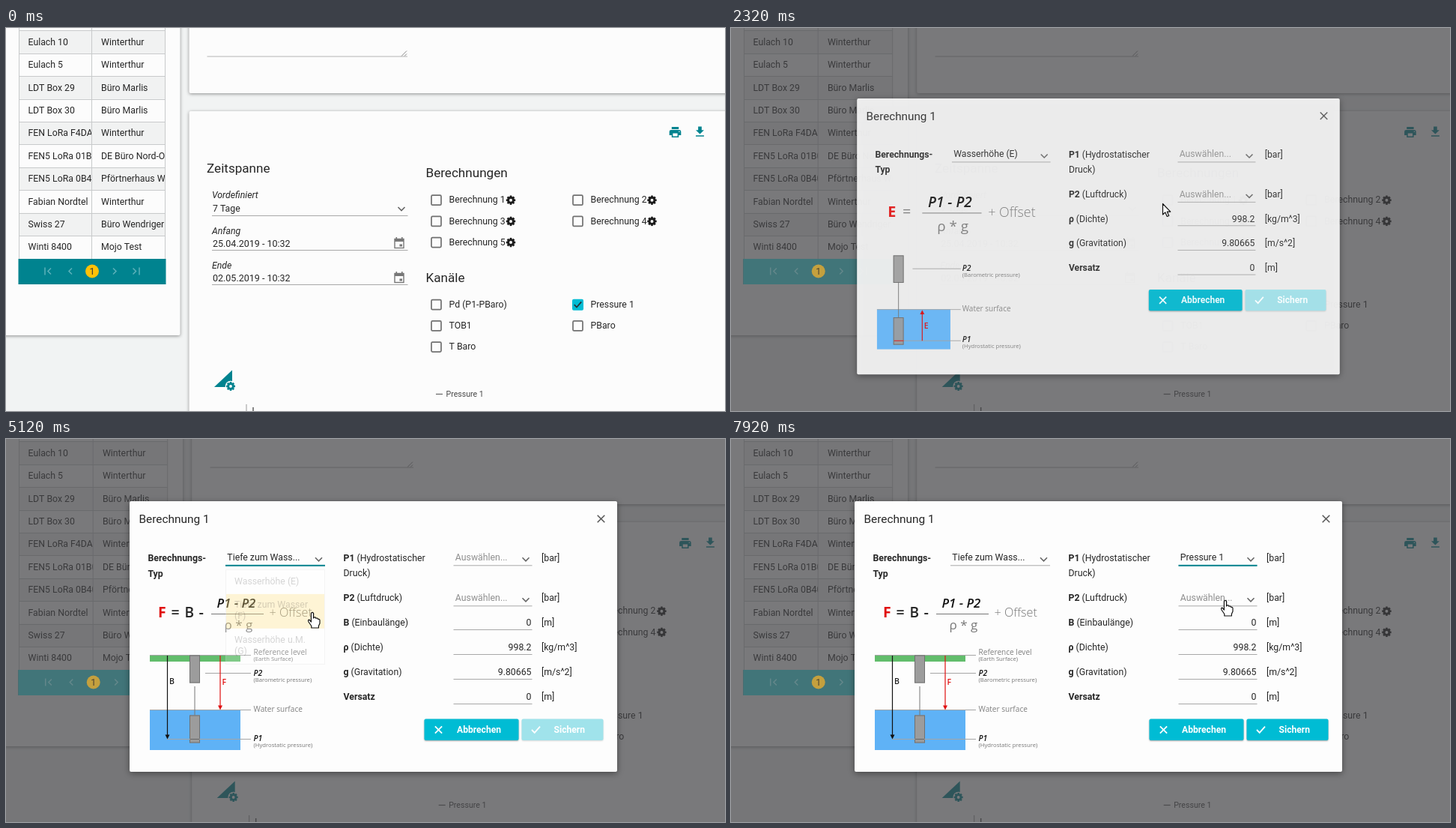
Recreate the animation shown at these times as an HTML page with a canvas. Size 960 px wide and 511 px high, loop 8000 ms.

```html
<!DOCTYPE html>
<html lang="de">
<head>
<meta charset="utf-8">
<title>Berechnung</title>
<style>
html, body { margin: 0; width: 100%; height: 100%; overflow: hidden; background: #f1f3f3; }
canvas { display: block; width: 960px; height: 511px; }
</style>
</head>
<body>
<canvas id="stage" width="960" height="511"></canvas>
<script>
const ctx = document.getElementById('stage').getContext('2d');
const LOOP = 8000;
const ROBOTO = 'Roboto, sans-serif', OPEN = '"Open Sans", sans-serif';
const TEAL = '#00838f', CYAN = '#00bcd4', INK = '#262626', GREY = '#777', RED = '#e01010';

const clamp = v => Math.max(0, Math.min(1, v));
const within = (t, a, b) => t >= a && t < b;

function text(s, x, y, { size = 12.3, color = INK, style = '400', align = 'left', font = ROBOTO } = {}) {
  ctx.font = `${style} ${size}px ${font}`;
  ctx.fillStyle = color;
  ctx.textAlign = align;
  ctx.fillText(s, x, y);
}
function rect(x, y, w, h, color) {
  ctx.fillStyle = color;
  ctx.fillRect(x, y, w, h);
}
function line(points, color, width = 1) {
  ctx.beginPath();
  points.forEach(([x, y], i) => i ? ctx.lineTo(x, y) : ctx.moveTo(x, y));
  ctx.strokeStyle = color;
  ctx.lineWidth = width;
  ctx.stroke();
}
function poly(points, color) {
  ctx.beginPath();
  points.forEach(([x, y]) => ctx.lineTo(x, y));
  ctx.closePath();
  ctx.fillStyle = color;
  ctx.fill();
}
function disc(x, y, r, color) {
  ctx.beginPath();
  ctx.arc(x, y, r, 0, 7);
  ctx.fillStyle = color;
  ctx.fill();
}
function card(x, y, w, h, color, blur, drop, shade, radius = 2) {
  ctx.save();
  ctx.shadowColor = shade;
  ctx.shadowBlur = blur;
  ctx.shadowOffsetY = drop;
  ctx.fillStyle = color;
  ctx.beginPath();
  ctx.roundRect(x, y, w, h, radius);
  ctx.fill();
  ctx.restore();
}
function clipped(x, y, w, h, draw) {
  ctx.save();
  ctx.beginPath();
  ctx.rect(x, y, w, h);
  ctx.clip();
  draw();
  ctx.restore();
}
const chevron = (x, y, color = '#666') =>
  line([[x - 4.5, y - 2], [x, y + 2.5], [x + 4.5, y - 2]], color, 1.6);
const check = (x, y, s, color) =>
  line([[x - 5 * s, y], [x - 1.6 * s, y + 3.5 * s], [x + 5 * s, y - 4 * s]], color, 1.8);
function cross(x, y, r, color, width) {
  line([[x - r, y - r], [x + r, y + r]], color, width);
  line([[x - r, y + r], [x + r, y - r]], color, width);
}
function gear(x, y, r, color) {
  for (let i = 0; i < 8; i++) {
    const a = i * Math.PI / 4, c = Math.cos(a), s = Math.sin(a);
    line([[x + c * r * .6, y + s * r * .6], [x + c * r, y + s * r]], color, r * .42);
  }
  ctx.beginPath();
  ctx.arc(x, y, r * .56, 0, 7);
  ctx.strokeStyle = color;
  ctx.lineWidth = r * .48;
  ctx.stroke();
}
function icon(path, x, y) {
  ctx.save();
  ctx.translate(x, y);
  ctx.scale(.78, .78);
  ctx.translate(-12, -12);
  ctx.fillStyle = TEAL;
  ctx.fill(new Path2D(path), 'evenodd');
  ctx.restore();
}
const PRINT = 'M5 8h14a3 3 0 0 1 3 3v6h-4v4H6v-4H2v-6a3 3 0 0 1 3-3zM8 14v5h8v-5zM18 11a1 1 0 1 0 2 0a1 1 0 1 0-2 0zM6 3h12v4H6z';
const LOAD = 'M19 9h-4V3H9v6H5l7 7zM5 18h14v2H5z';

// ---------- page ----------
const ROWS = [
  ['Eulach 10', 'Winterthur'], ['Eulach 5', 'Winterthur'],
  ['LDT Box 29', 'Büro Marlis'], ['LDT Box 30', 'Büro Marlis'],
  ['FEN LoRa F4DA', 'Winterthur'], ['FEN5 LoRa 01B0', 'DE Büro Nord-Ost'],
  ['FEN5 LoRa 0B40', 'Pförtnerhaus West'], ['Fabian Nordtel', 'Winterthur'],
  ['Swiss 27', 'Büro Wendriger'], ['Winti 8400', 'Mojo Test']
];

function table(X) {
  const left = 17, mid = X(114.5), right = X(212.5), step = 30.4, top = 3.4;
  ROWS.forEach(([name, place], i) => {
    const y = top + step * i;
    if (i % 2 === 0) rect(left, y, right - left, step, '#f1f2f2');
    line([[left, Math.round(y) + .5], [right, Math.round(y) + .5]], '#c8cacb');
    clipped(left, y, mid - left, step, () => text(name, 29.5, y + 19.4));
    clipped(mid, y, right - mid, step, () => text(place, X(127), y + 19.4));
  });
  for (const x of [left + .5, mid, right]) line([[x, 0], [x, 308]], '#c8cacb');
}
function pager(X, { bar, soft, dot, ink }) {
  const y = 324.5;
  const arrow = (x, d) => line([[x - 2 * d, y - 4], [x + 2 * d, y], [x - 2 * d, y + 4]], soft, 1.5);
  rect(16.5, 308, X(213.5) - 16.5, 34, bar);
  line([[X(52), y - 5], [X(52), y + 5]], soft, 1.5);
  arrow(X(58), -1);
  arrow(X(86), -1);
  arrow(X(145), 1);
  arrow(X(171.5), 1);
  line([[X(178), y - 5], [X(178), y + 5]], soft, 1.5);
  disc(X(115), y, 9, dot);
  text('1', X(115), 329, { color: ink, align: 'center' });
}
const BRIGHT = { bar: TEAL, soft: '#5db2ba', dot: '#ffc107', ink: '#333' };
const DIMMED = { bar: '#417579', soft: '#64888b', dot: '#c4a03e', ink: '#4a4030' };

function calendar(x, y) {
  ctx.strokeStyle = '#777';
  ctx.lineWidth = 1.4;
  ctx.strokeRect(x - 6, y - 5.5, 12, 12);
  rect(x - 6, y - 5.5, 12, 3.5, '#777');
  rect(x - 4.5, y - 8, 1.6, 3, '#777');
  rect(x + 3, y - 8, 1.6, 3, '#777');
  rect(x + .5, y + 1.5, 3.5, 3, '#777');
}
function option(X, col, y, label, kind) {
  const x = X(col ? 756.5 : 567.5);
  if (kind === 'on') {
    card(x - .5, y - 7.5, 15, 15, CYAN, 0, 0, 'transparent');
    check(x + 7, y, .95, '#263238');
  } else {
    ctx.strokeStyle = '#707070';
    ctx.lineWidth = 1.7;
    ctx.beginPath();
    ctx.roundRect(x + .5, y - 6.5, 13, 13, 1.5);
    ctx.stroke();
  }
  text(label, X(col ? 780.5 : 591.5), y + 3.7);
  if (kind === 'gear') gear(X(col ? 862.5 : 674), y, 6.2, '#1c1c1c');
}

function page(X) {
  const shade = 'rgba(0,0,0,.42)', paper = '#fcfcfc';
  rect(0, 0, 960, 511, '#f1f3f3');
  card(-20, -20, X(232.5) + 20, 430, paper, 4, 1, shade);
  card(X(244.5), -20, 800, 107, paper, 4, 1, shade);
  card(X(244.5), 111, 800, 460, paper, 4, 1, shade);
  table(X);
  pager(X, BRIGHT);

  line([[X(268.5), 38], [X(536), 38]], '#b5b5b5');
  line([[X(536) - 8, 37.5], [X(536) - 1, 30.5]], '#888');
  line([[X(536) - 4, 37.5], [X(536) - 1, 34.5]], '#888');
  icon(PRINT, X(893.5), 139);
  icon(LOAD, X(926.5), 138.5);

  const head = { size: 17.1 }, ital = { style: 'italic 400' };
  text('Zeitspanne', X(268), 193, head);
  text('Berechnungen', X(560.5), 199, head);
  text('Kanäle', X(560.5), 339, head);

  text('Vordefiniert', X(275), 226.8, ital);
  text('7 Tage', X(276), 244.5);
  chevron(X(528), 241);
  text('Anfang', X(275), 274.8, ital);
  text('25.04.2019 - 10:32', X(276), 291.5, { size: 12.5 });
  text('Ende', X(275), 320.8, ital);
  text('02.05.2019 - 10:32', X(276), 338, { size: 12.5 });
  for (const y of [250.5, 296.5, 342.5]) line([[X(275), y], [X(536.5), y]], '#a8a8a8');
  calendar(X(525), 287);
  calendar(X(525), 333);

  for (let i = 0; i < 5; i++)
    option(X, i % 2, 229.7 + 28.2 * (i >> 1), `Berechnung ${i + 1}`, 'gear');
  option(X, 0, 369.2, 'Pd (P1-PBaro)');
  option(X, 1, 369.2, 'Pressure 1', 'on');
  option(X, 0, 397.4, 'TOB1');
  option(X, 1, 397.4, 'PBaro');
  option(X, 0, 425.6, 'T Baro');

  // the chart keeps its size and only follows its panel's left edge
  ctx.save();
  ctx.translate(X(244.5) - 244.5, 0);
  poly([[278, 479], [302, 456.5], [302, 479]], TEAL);
  disc(300, 478, 7.3, paper);
  gear(300, 478, 6, TEAL);
  line([[574, 488.5], [583, 488.5]], '#666', 1.2);
  text('Pressure 1', 587.5, 492.3, { size: 10.6, color: '#484848' });
  line([[321, 502], [321, 511]], '#999');
  line([[330, 506], [330, 511]], '#555', 1.4);
  ctx.restore();
}

// ---------- dialog ----------
function formula(deep) {
  const f = (s, x, y, size, style, color) => text(s, x, y, { size, style, color, font: OPEN });
  if (deep) {
    f('F', 203, 238, 19.5, '700', RED);
    f('=', 220.5, 238, 19.5, '600', INK);
    f('B', 238.5, 238, 19, '600', INK);
    f('-', 257.5, 238, 20, '600', INK);
    f('P1 - P2', 281.5, 224.5, 16.8, 'italic 600', '#111');
    line([[274, 233.5], [344, 233.5]], GREY);
    f('ρ * g', 291.5, 253.5, 17, '400', GREY);
    f('+ Offset', 351.5, 237, 16.2, '300', GREY);
  } else {
    f('E', 206.5, 242.5, 20, '700', RED);
    f('=', 226.5, 242.5, 20, '400', GREY);
    f('P1 - P2', 260.7, 229, 19.3, 'italic 600', '#111');
    line([[253, 237.5], [333, 237.5]], GREY);
    f('ρ * g', 273, 261.5, 19, '400', GREY);
    f('+ Offset', 341.7, 242.5, 18.1, '300', GREY);
  }
}
function sensor(x, y) {
  rect(x, y, 14, 37, '#9c9c9c');
  ctx.strokeStyle = '#707070';
  ctx.lineWidth = 1;
  ctx.strokeRect(x + .5, y + .5, 13, 36);
}
function arrow(x, from, to, color) {
  const d = Math.sign(to - from);
  line([[x, from], [x, to - 3 * d]], color, 1.2);
  poly([[x, to], [x - 3, to - 6 * d], [x + 3, to - 6 * d]], color);
}
function diagram(deep) {
  const small = { size: 7.7, color: GREY, font: OPEN };
  const plain = { size: 10.1, color: '#808080', font: OPEN };
  const mark = { size: 10.5, style: 'italic 600', color: '#111', font: OPEN };
  const tag = color => ({ size: 10.5, style: '600', color, font: OPEN });
  const water = deep ? 361 : 367, right = deep ? 313 : 291, x = deep ? 245 : 214;
  const tx = deep ? 330.5 : 307, end = deep ? 327 : 305, rod = x + 7, low = deep ? 400.5 : 409.5;
  const rule = (a, y) => line([[a, y], [end, y]], '#a5a5a5');

  rect(192, water, right - 192, 54, '#5fb2f6');
  rule(192, water + .5);
  if (deep) {
    rect(192, 288, 121, 9, '#62bd6c');
    rule(192, 288.5);
    text('Reference level', tx, 287.5, plain);
    text('(Earth Surface)', tx, 296, small);
  }
  line([[rod, 330], [rod, water + 12]], '#777');
  sensor(x, deep ? 288.5 : 294.5);
  sensor(x, deep ? 368.5 : 378);
  rule(x + (deep ? 21 : 26), 312.5);
  rule(deep ? 215 : x + 2, low);
  text('P2', tx, 315.7, mark);
  text('(Barometric pressure)', tx, 323.7, small);
  text('Water surface', tx, water + 2.5, plain);
  text('P1', tx, low + 2, mark);
  text('(Hydrostatic pressure)', tx, low + 10, small);
  if (deep) {
    line([[x + 1, low], [x + 13, low]], '#666');
    arrow(215.5, 289, 400.5, '#111');
    text('B', 218, 327, tag('#222'));
    arrow(286, 289, 361.5, RED);
    text('F', 288.5, 327.7, tag(RED));
  } else {
    line([[x + 1, low], [x + 14, low]], RED);
    arrow(253, low, 368, RED);
    text('E', 255.5, 393.5, tag(RED));
  }
}
function select(x, w, y, value, empty, focus) {
  text(value, x + 2.3, y, { color: empty ? '#8f8f8f' : INK });
  chevron(x + w - 8.5, y - 2);
  line([[x, y + 6.5], [x + w, y + 6.5]], '#a8a8a8');
  const half = w / 2 * focus;
  if (half > 0) rect(x + w / 2 - half, y + 5.5, half * 2, 2, TEAL);
}
function label(bold, rest, y) {
  text(bold, 450.5, y, { style: '700' });
  const w = ctx.measureText(bold + ' ').width;
  text(rest, 450.5 + w, y);
}
function button(x, y, w, name, tx, on) {
  card(x - .5, y - .5, w + 1, 28.5, on ? CYAN : '#a0e3eb', 2, 1, on ? 'rgba(0,0,0,.35)' : 'rgba(0,0,0,.15)');
  text(name, tx, y + 18.2, { style: '700', color: '#fff', size: 12.1 });
}
function menu(x, y, w, items, t, open, close) {
  if (!within(t, open, close + 100)) return;
  const a = t < close ? clamp((t - open) / 150) : clamp(1 - (t - close) / 100);
  const h = items.reduce((sum, it) => sum + it.h, 0);
  ctx.save();
  ctx.globalAlpha = a;
  ctx.translate(0, (1 - a) * 6);
  // a shadow would shine through a translucent panel
  card(x, y, w, h + 1, '#fff', 4, 1, a < 1 ? 'transparent' : 'rgba(0,0,0,.45)');
  ctx.strokeStyle = '#c8c8c8';
  ctx.lineWidth = 1;
  ctx.strokeRect(x + .5, y + .5, w - 1, h);
  for (const it of items) {
    if (it.fill) rect(x + 1, y + 1, w - 2, it.h - 1, it.fill);
    it.lines.forEach((s, i) => text(s, x + 12, y + (it.lines.length > 1 ? 19 : 20) + 15.6 * i));
    y += it.h;
  }
  ctx.restore();
}

function dialog(t) {
  const deep = t >= 5040, chosen = t >= 7520;
  const h = deep ? 361 : 372;
  const p = 1 - Math.pow(1 - clamp((t - 2200) / 200), 2.5);
  const cx = 490.5, cy = 83 + h / 2, s = .9 + .1 * p;
  ctx.save();
  ctx.globalAlpha = p;
  ctx.translate(cx, cy + .25 * h * (1 - p));
  ctx.scale(s, s);
  ctx.translate(-cx, -cy);

  card(165, 83, 651, h, '#fdfdfd', 8, 2, 'rgba(0,0,0,.42)');
  text('Berechnung 1', 177.5, 112, { size: 15.4 });
  cross(794.5, 106.5, 4.8, '#555', 1.5);
  text('Berechnungs-', 189.5, 162.5, { style: '700' });
  text('Typ', 189.5, 183.5, { style: '700' });
  const typeFocus = t < 6560 ? clamp((t - 3512) / 250) : 0;
  select(293, 133, 162.3, deep ? 'Tiefe zum Wass...' : 'Wasserhöhe (E)', false, typeFocus);

  formula(deep);
  diagram(deep);

  label('P1', '(Hydrostatischer', 162.5);
  text('Druck)', 450.5, 183.3);
  label('P2', '(Luftdruck)', 216.3);
  select(597.5, 105, 162.3, chosen ? 'Pressure 1' : 'Auswählen...', !chosen, clamp((t - 6600) / 250));
  select(597.5, 105, 216.3, 'Auswählen...', true, 0);
  text('[bar]', 715, 162.5);
  text('[bar]', 715, 216.3);

  const rows = [
    ['ρ', '(Dichte)', '998.2', '[kg/m^3]'],
    ['g', '(Gravitation)', '9.80665', '[m/s^2]'],
    ['Versatz', '', '0', '[m]']
  ];
  if (deep) rows.unshift(['B', '(Einbaulänge)', '0', '[m]']);
  rows.forEach(([name, note, value, unit], i) => {
    const y = 249.3 + 33 * i;
    label(name, note, y);
    text(value, 701.5, y, { align: 'right' });
    text(unit, 715, y);
    line([[597.5, y + 5.2], [702.5, y + 5.2]], '#a8a8a8');
  });

  const by = deep ? 374 : 341;
  button(559, by, 125, 'Abbrechen', 602, true);
  cross(577.5, by + 14, 4.6, '#fff', 1.8);
  button(689, by, 108, 'Sichern', 731.5, chosen);
  check(707.5, by + 14, 1.1, '#fff');

  const amber = '#ffca28', hover = '#efefef', over = t > 4350;
  menu(293, 169, 133, [
    { h: 32, lines: ['Wasserhöhe (E)'], fill: deep ? '' : amber },
    { h: 47, lines: ['Tiefe zum Wasser', '(F)'], fill: deep ? amber : over ? hover : '' },
    { h: 47, lines: ['Wasserhöhe u.M.', '(G)'] }
  ], t, 3480, 5040);
  menu(597.5, 169, 105, [
    { h: 31, lines: ['Pd (P1-PBaro)'], fill: within(t, 6900, 7250) ? hover : '' },
    { h: 31, lines: ['Pressure 1'], fill: t > 7250 ? hover : '' },
    { h: 32, lines: ['PBaro'] }
  ], t, 6640, 7520);
  ctx.restore();
}

// ---------- pointer ----------
const PATH = [
  [600, 640, 530], [1750, 576.5, 234.5], [2450, 576.5, 234.5], [3280, 379, 158],
  [3800, 379, 158], [4750, 409, 231], [5280, 409, 231], [6380, 664, 162],
  [6700, 664, 162], [7000, 669, 186], [7100, 669, 186], [7400, 660, 215], [LOOP, 660, 215]
];
const CLICKS = [[2080, 2220], [3370, 3480], [4930, 5040], [6540, 6640], [7420, 7520]];
const ARROW = new Path2D('M0 0V14.5L3.3 11.4L5.8 17L8.2 16L5.8 10.6H10.3Z');
const HAND = new Path2D('M-1.6 1.5Q0-.7 1.6 1.5V8Q2.4 6.8 3.2 7Q4.6 6.3 4.8 8.3Q7.2 7.3 7.6 9.4Q9.8 9 10 11V15L8.4 18.5V21H-1.2V18.5L-5 13Q-6.2 10.3-4 10.2L-1.6 13Z');

function pointer(t) {
  if (t < PATH[0][0]) return;
  const i = PATH.findIndex(k => k[0] > t);
  const [t0, x0, y0] = PATH[i - 1], [t1, x1, y1] = PATH[i];
  const u = (t - t0) / (t1 - t0), e = u * u * (3 - 2 * u);
  ctx.save();
  ctx.translate(x0 + (x1 - x0) * e, y0 + (y1 - y0) * e);
  if (CLICKS.some(([a, b]) => within(t, a, b))) {
    ctx.beginPath();
    ctx.arc(2.5, 4, 10, 0, 7);
    ctx.strokeStyle = '#14c8e0';
    ctx.lineWidth = 4;
    ctx.stroke();
  }
  const shape = within(t, 3150, 5450) || t > 6250 ? HAND : ARROW;
  ctx.fillStyle = '#fff';
  ctx.strokeStyle = '#111';
  ctx.lineWidth = 1.2;
  ctx.lineJoin = 'round';
  ctx.fill(shape);
  ctx.stroke(shape);
  ctx.restore();
}

function draw(t) {
  const open = t >= 2200;
  // without its scrollbar the page spreads a little wider
  const X = x => x * (open ? 1.015 : 1);
  page(X);
  if (open) {
    rect(0, 0, 960, 511, 'rgba(66,66,69,.7)');
    pager(X, DIMMED);
    dialog(t);
  }
  pointer(t);
}
const start = performance.now();
function tick() {
  draw((performance.now() - start) % LOOP);
  requestAnimationFrame(tick);
}
tick();
</script>
</body>
</html>
```
